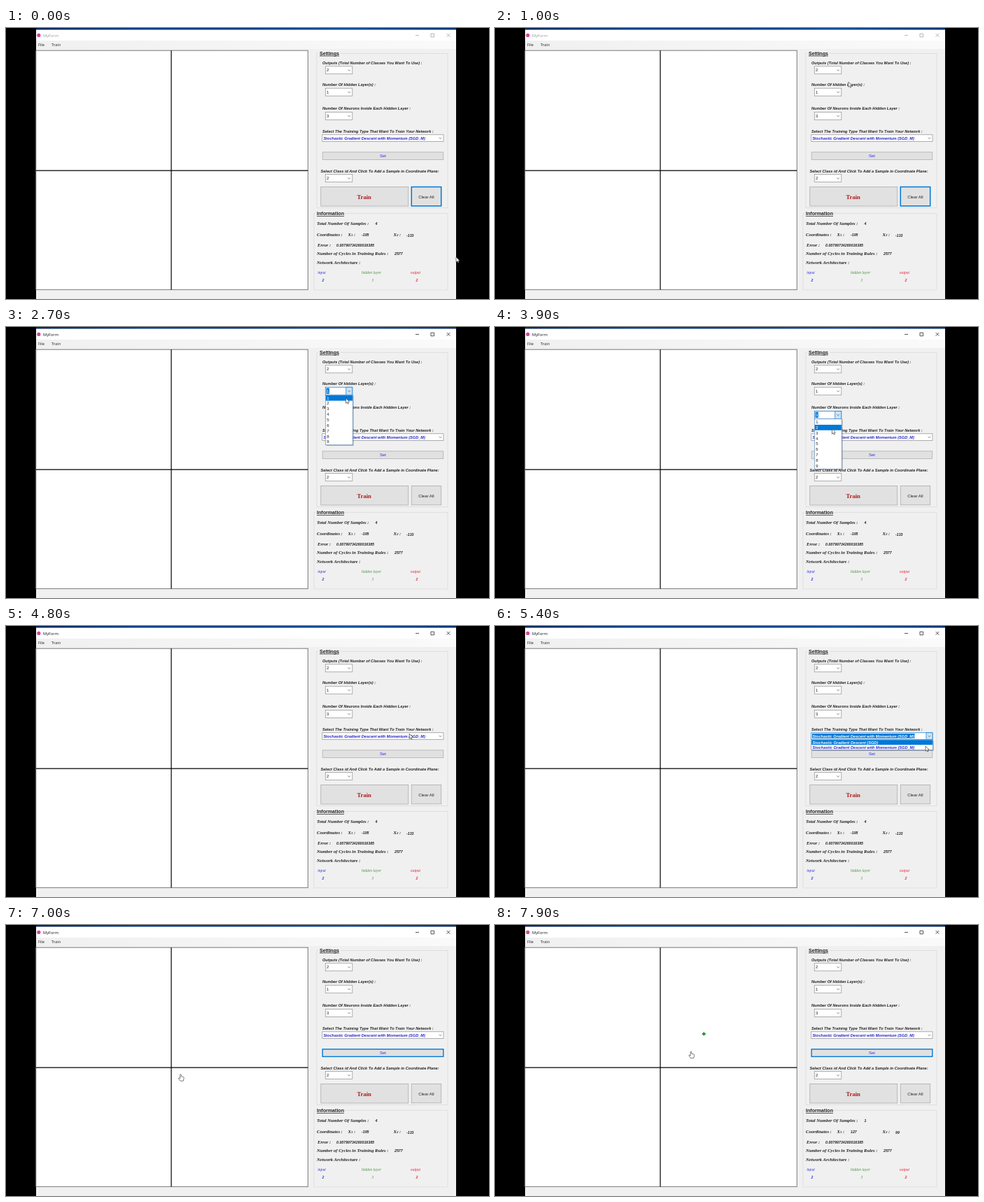
These frames come from a looping animation (690 px wide and 388 px high, 8000 ms). An HTML page:

```html
<!DOCTYPE html>
<html lang="en">
<head>
<meta charset="utf-8">
<title>Network form</title>
<style>
html, body { margin: 0; width: 100%; height: 100%; overflow: hidden; background: #000; }
svg { display: block; width: 690px; height: 388px; }
text { white-space: pre; }
.ui { font: 5.7px "Open Sans", sans-serif; }
.sans { font: 6px "Liberation Sans", Arial, sans-serif; }
.label { font: italic bold 5.6px "Liberation Sans", Arial, sans-serif; }
.head { font: bold 7.1px "Liberation Sans", Arial, sans-serif; text-decoration: underline; }
.info { font: italic bold 6.6px "Liberation Serif", "Times New Roman", serif; }
.value { font: italic bold 5.25px "Liberation Sans", Arial, sans-serif; }
.layer { font: italic 5.6px "Liberation Serif", "Times New Roman", serif; }
.train { font: bold 8.6px "Liberation Serif", "Times New Roman", serif; }
.mid { text-anchor: middle; }
</style>
</head>
<body>
<svg id="stage" viewBox="0 0 690 388" xmlns="http://www.w3.org/2000/svg">
<defs>
<linearGradient id="sky">
<stop offset="0" stop-color="#08285a"/><stop offset=".25" stop-color="#0a3f8c"/>
<stop offset=".5" stop-color="#0b3c86"/><stop offset=".75" stop-color="#0c4a9c"/>
<stop offset="1" stop-color="#0a3272"/>
</linearGradient>
<linearGradient id="menu">
<stop offset="0" stop-color="#f0f0f0"/><stop offset="1" stop-color="#fafafa"/>
</linearGradient>
</defs>
<g id="view"></g>
</svg>
<script>
const LOOP = 8000, STEP = 100;
const BLUE = '#0078d7', PALE = '#7fb0e6', INK = '#222', LINK = '#2424c8';
const SGD = 'Stochastic Gradient Descent (SGD)';
const SGDM = 'Stochastic Gradient Descent with Momentum (SGD_M)';
const view = document.getElementById('view');

// Cursor stops: time, x, y
const path = [
  [0, 643, 327], [100, 643, 327], [900, 510, 82], [1200, 490, 60], [1600, 490, 60],
  [1900, 489, 80], [2300, 490, 91], [2400, 490, 91], [2700, 485.5, 101], [3300, 485.5, 101],
  [3600, 490, 125], [3900, 481.5, 145], [4300, 481.5, 145], [5100, 620, 157],
  [5200, 620, 157], [5400, 615, 171], [5800, 612, 174], [6100, 612, 174],
  [6400, 572.5, 185], [6600, 572.5, 185], [7100, 212, 217], [7400, 298, 156],
  [7600, 298, 156], [7900, 280, 181], [8000, 280, 181]
];

const within = (t, a, b) => t >= a && t < b;
const rect = (x, y, w, h, fill, stroke = 'none', sw = .8) =>
  `<rect x="${x}" y="${y}" width="${w}" height="${h}" fill="${fill}" stroke="${stroke}" stroke-width="${sw}"/>`;
const text = (x, y, s, cls, fill = INK) => `<text x="${x}" y="${y}" class="${cls}" fill="${fill}">${s}</text>`;
const line = (d, stroke, sw = .8) => `<path d="${d}" fill="none" stroke="${stroke}" stroke-width="${sw}"/>`;

function combo(x, y, w, h, value, o = {}) {
  const cls = o.cls || 'sans', base = y + h / 2 + 2;
  let s = rect(x, y, w, h, '#fff', o.open ? BLUE : o.focus ? PALE : '#8f8f8f', .7);
  if (o.open) s += rect(x + w - 9, y, 9, h, '#cce4f7', BLUE, .7);
  if (o.focus) s += rect(x + 1.2, y + 1.3, o.sel || 4.4, h - 2.8, BLUE);
  s += text(x + 1.6, base, value, cls, o.focus ? '#fff' : o.fill || INK);
  const cx = x + w - 4.6, cy = y + h / 2;
  return s + line(`M${cx - 1.8} ${cy - .7}l1.8 1.7 1.8-1.7`, '#555', .7);
}

function list(x, y, w, row, items, hot, cls, fill) {
  const h = row * items.length + 1;
  let s = rect(x + 1.2, y + 1.2, w, h, 'rgba(0,0,0,.3)') + rect(x, y, w, h, '#fff', '#4a7fb5', .6);
  items.forEach((item, i) => {
    const top = y + .5 + i * row;
    if (i === hot) s += rect(x + .4, top, w - .8, row, BLUE);
    s += text(x + 1.8, top + row / 2 + 2, item, cls, i === hot ? '#fff' : fill);
  });
  return s;
}

const numbers = (from, to) => Array.from({ length: to - from + 1 }, (_, i) => from + i);

function frame(active) {
  const ink = active ? '#111' : '#999';
  return rect(43, 0, 600, 3, 'url(#sky)') + rect(43, 2.7, 600, 385.3, '#f0f0f0')
    + rect(43, 2.7, 600, 15.3, '#fff') + rect(43, 18, 600, 12, 'url(#menu)')
    + '<circle cx="46.8" cy="10.4" r="2.6" fill="#d14b92"/>'
    + text(53, 12.5, 'MyForm', 'ui', ink)
    + line('M585 10.5h5', ink, .7) + line('M607 8.2h4.6v4.6h-4.6z', ink, .7)
    + line('M629.6 8l4.8 4.8m0-4.8l-4.8 4.8', ink, .7)
    + text(46, 26, 'File', 'ui') + text(65, 26, 'Train', 'ui')
    + rect(42.8, 32.2, 388.5, 342.5, '#fff', '#6c6c6c', .9)
    + line('M236.1 32.2V374.7M43 204.1H431.3', '#000', 1.2);
}

function settings(t) {
  const first = within(t, 1200, 2400), hidden = within(t, 2400, 3400);
  const neurons = within(t, 3600, 4500), kind = within(t, 5200, 6600);
  const hover = within(t, 6300, 6600), done = t >= 6600, clear = t < 1200;
  return line('M446 36.5H444V257.5H631V36.5H478', '#d9d9d9', .7)
    + text(448, 38.7, 'Settings', 'head')
    + text(452, 51.7, 'Outputs (Total Number of Classes You Want To Use) :', 'label')
    + text(452, 83.3, 'Number Of Hidden Layer(s) :', 'label')
    + text(452, 117.4, 'Number Of Neurons Inside Each Hidden Layer :', 'label')
    + text(452, 150.4, 'Select The Training Type That Want To Train Your Network :', 'label')
    + text(449.5, 206.8, 'Select Class id And Click To Add a Sample in Coordinate Plane:', 'label')
    + combo(456.3, 54.8, 38.5, 11, 2, { focus: first, open: within(t, 1200, 1700) })
    + combo(456.3, 86.2, 38.5, 11, 1, { focus: hidden, open: hidden })
    + combo(456.3, 120.4, 38.5, 11, 3, { focus: neurons, open: neurons })
    + combo(456.3, 209.6, 38.5, 11, 2)
    + combo(451.8, 152.8, 173.2, 9.6, SGDM,
        { cls: 'label', fill: LINK, focus: kind, open: within(t, 5200, 5700), sel: 146.5 })
    + rect(452.2, 177.8, 172.6, 10.6, hover ? '#e5eef8' : '#e1e1e1',
        done ? BLUE : hover ? PALE : '#b0b0b0', done ? 1.4 : .8)
    + text(538.5, 185.2, 'Set', 'sans mid', '#3030f0')
    + rect(449.8, 227.5, 125, 27.5, '#e1e1e1', '#adadad')
    + text(511.7, 244.6, 'Train', 'train mid', '#b01c1c')
    + rect(579.3, 227.5, 42.4, 27.3, '#e1e1e1', clear ? BLUE : '#adadad', clear ? 1.5 : .8)
    + text(600.3, 243.6, 'Clear All', 'sans mid');
}

function info(t) {
  const added = t >= 7500;
  const axis = (x, n) => text(x, 298, `X<tspan font-size="5">${n}</tspan> :`, 'info');
  const layer = (x, name, n, fill, cls = 'value') =>
    text(x, 351.8, name, 'layer mid', fill) + text(x + 2, 363.2, n, cls + ' mid', fill);
  return line('M442 265.5H440V375H631V265.5H483', '#d9d9d9', .7)
    + text(444, 268, 'Information', 'head')
    + text(444, 282.3, 'Total Number Of Samples :', 'info') + text(527.5, 282.3, added ? 1 : 4, 'value')
    + text(444, 297.8, 'Coordinates :', 'info') + axis(488.5, 1) + axis(553.5, 2)
    + text(508, 298, added ? 127 : -195, 'value') + text(572, 298.6, added ? 99 : -133, 'value')
    + text(445, 312.7, 'Error :', 'info') + text(472, 312.9, '0.00799734260016385', 'value')
    + text(444, 325, 'Number of Cycles in Training Rules :', 'info') + text(555, 325.2, 2577, 'value')
    + text(444, 338.4, 'Network Architecture :', 'info')
    + layer(451, 'input', 2, '#3434e0') + layer(522, 'hidden layer', 3, '#4a944a', 'layer')
    + layer(585, 'output', 2, '#e02c3c');
}

function menus(t) {
  let s = '';
  if (within(t, 1200, 1700)) s += list(456.5, 66, 38.8, 7.85, numbers(2, 9), 0, 'sans', INK);
  if (within(t, 2400, 3400)) s += list(456.5, 97.2, 38.8, 7.85, numbers(1, 9), 0, 'sans', INK);
  if (within(t, 3600, 4500)) s += list(456.5, 131.6, 38.8, 7.85, numbers(1, 9), t < 3800 ? 2 : 1, 'sans', INK);
  if (within(t, 5200, 5700)) s += list(451.8, 162.7, 173.6, 6.9, [SGD, SGDM], t < 5500 ? 0 : 1, 'label', LINK);
  return s;
}

function cursor(t) {
  let i = 1;
  while (path[i][0] <= t && i < path.length - 1) i++;
  const [t0, x0, y0] = path[i - 1], [t1, x1, y1] = path[i];
  const k = Math.min(1, (t - t0) / (t1 - t0)), e = k * k * (3 - 2 * k);
  const x = x0 + (x1 - x0) * e, y = y0 + (y1 - y0) * e;
  const arrow = 'M0 1v7.2l1.7-1.5 1.1 2.4 1.2-.6-1.1-2.3 2.2-.2z';
  const hand = 'M-.8 .5Q0-.5.8.5V3.2L4 4Q4.9 4.4 4.7 5.6L3.8 9.6H-.5L-2.9 6.2Q-3.2 5-2 5.2L-.8 6.2z';
  const d = x < 431 && y > 33 ? hand : arrow;
  return `<path d="${d}" transform="translate(${x} ${y})" fill="#fff" stroke="#444" stroke-width=".7" stroke-linejoin="round"/>`;
}

function render(t) {
  const plus = t >= 7500 ? line('M295.8 155.9h5.2M298.4 153.3v5.2', '#168a16', 1.6) : '';
  view.innerHTML = frame(t >= 1200) + settings(t) + info(t) + plus + menus(t) + cursor(t);
}

let last = -1;
function tick() {
  const t = Math.floor(performance.now() % LOOP / STEP) * STEP;
  if (t !== last) render(last = t);
  requestAnimationFrame(tick);
}
tick();
</script>
</body>
</html>
```
